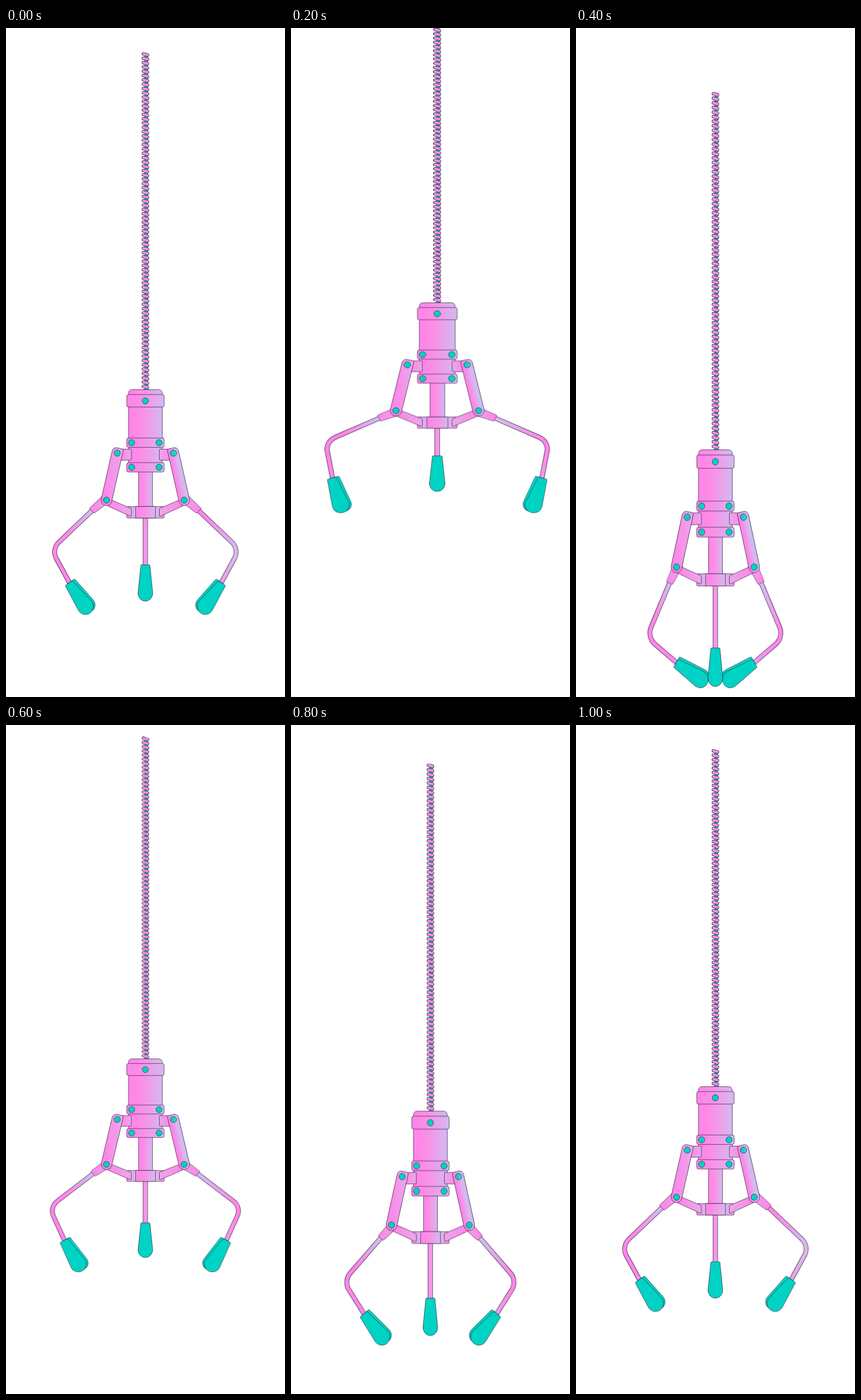
An HTML page without scripts that plays this animation: 483x1159 px, repeating every 1200 ms.

```html
<!DOCTYPE html>
<html lang="en">
<head>
<meta charset="utf-8">
<title>Claw</title>
<style>
  html, body { margin: 0; width: 100%; height: 100%; overflow: hidden; background: #fff; }
  svg { display: block; width: 483px; height: 1159px; }

  .line { stroke: #2d1f40; stroke-width: .7; stroke-linejoin: round; }
  .teal { fill: #00d3c3; }
  .edge { stroke: #2d1f40; fill: none; }
  .rod { fill: none; stroke: var(--rod); stroke-width: 6.6; }

  .left { --rod: url(#rodL); --plate: url(#plateL); --bolt: #00d3c3; }
  .right { --rod: url(#rodR); --plate: url(#plateR); --bolt: url(#boltR); }
  .plate { fill: var(--plate); }
  .pin { fill: var(--bolt); }

  .claw, .arm, .drop, .near, .far { animation: 1.2s step-end infinite; }
  .claw { animation-name: claw; transform-origin: 0 0; }
  .arm { animation-name: arm; transform-origin: 174px 818px; }
  .drop { animation-name: drop; }
  .near { animation-name: near; }
  .far { animation-name: far; }

  /* whole claw: place of the top bolt, then stretch */
  @keyframes claw {
    0%, 83.333%, 100% { transform: translate(241.25px, 646px) scale(1, 1); }
    16.667% { transform: translate(253.1px, 495px) scale(1.063, .977); }
    33.333% { transform: translate(241.25px, 751.4px) scale(1, 1.0605); }
    50% { transform: translate(241.25px, 597px) scale(1, .9545); }
    66.667% { transform: translate(241.25px, 689.1px) scale(1, 1.0305); }
  }
  @keyframes arm {
    0%, 83.333%, 100% { transform: none; }
    16.667% { transform: translate(2.6px, 3.8px) rotate(18.3deg); }
    33.333% { transform: translate(4.4px, -.6px) rotate(-22.5deg); }
    50% { transform: translate(3.6px, 1px) rotate(5deg); }
    66.667% { transform: translate(5.2px, 1.6px) rotate(-4.5deg); }
  }
  @keyframes drop {
    0%, 83.333%, 100% { transform: none; }
    16.667% { transform: translateY(-32px); }
    33.333% { transform: translateY(20.2px); }
    50% { transform: translateY(-6px); }
    66.667% { transform: translateY(10.8px); }
  }
  /* the sheen on the right rod swaps ends */
  @keyframes near {
    0%, 83.333%, 100% { stop-color: #ff86e8; }
    16.667% { stop-color: #d4b9f0; }
  }
  @keyframes far {
    0%, 83.333%, 100% { stop-color: #d9b8ee; }
    16.667% { stop-color: #ff86e8; }
  }
</style>
</head>
<body>
<svg viewBox="0 0 483 1159">
  <defs>
    <linearGradient id="body">
      <stop offset=".12" stop-color="#ff86e8"/>
      <stop offset=".4" stop-color="#fb8fe6"/>
      <stop offset="1" stop-color="#d4b9f0"/>
    </linearGradient>
    <linearGradient id="soft">
      <stop offset=".1" stop-color="#ff86e8"/>
      <stop offset="1" stop-color="#e9a9ea"/>
    </linearGradient>
    <linearGradient id="pale">
      <stop offset="0" stop-color="#ff86e8"/>
      <stop offset=".22" stop-color="#d4b9f0"/>
      <stop offset=".8" stop-color="#dcb4ee"/>
      <stop offset="1" stop-color="#fb8fe6"/>
    </linearGradient>
    <linearGradient id="plateL" x1="0" y1="1" x2=".86" y2="-.1">
      <stop offset=".2" stop-color="#ff86e8"/>
      <stop offset="1" stop-color="#e8aaea"/>
    </linearGradient>
    <linearGradient id="plateR">
      <stop offset="0" stop-color="#cfbdf0"/>
      <stop offset=".35" stop-color="#d8b6ee"/>
      <stop offset=".8" stop-color="#ff86e8"/>
    </linearGradient>
    <linearGradient id="boltR">
      <stop offset="0" stop-color="#4fd0cf"/>
      <stop offset=".7" stop-color="#00d3c3"/>
    </linearGradient>
    <linearGradient id="rodL" gradientUnits="userSpaceOnUse" x1="150" y1="0" x2="84" y2="0">
      <stop offset=".08" stop-color="#d4b9f0"/>
      <stop offset=".7" stop-color="#ff86e8"/>
    </linearGradient>
    <linearGradient id="rodR" gradientUnits="userSpaceOnUse" x1="150" y1="0" x2="84" y2="0">
      <stop class="near" offset=".2"/>
      <stop class="far" offset=".95"/>
    </linearGradient>

    <circle id="bolt" class="line" r="5.4"/>

    <!-- rope: one coil, doubled up at a pitch of 7.48 -->
    <g id="c1" stroke-linecap="round">
      <path d="M239 51.6 245 48.6" stroke="#2d1f40" stroke-width="3.8"/>
      <path d="M239 51.6 245 48.6" stroke="#00d3c3" stroke-width="2.5"/>
      <path d="M237.8 44.8 245 46.7" stroke="#2d1f40" stroke-width="5.6"/>
      <path d="M237.8 44.8 245 46.7" stroke="#f895e5" stroke-width="4.1"/>
    </g>
    <g id="c2"><use href="#c1"/><use href="#c1" y="7.48"/></g>
    <g id="c4"><use href="#c2"/><use href="#c2" y="14.96"/></g>
    <g id="c8"><use href="#c4"/><use href="#c4" y="29.92"/></g>
    <g id="c16"><use href="#c8"/><use href="#c8" y="59.84"/></g>
    <g id="c32"><use href="#c16"/><use href="#c16" y="119.68"/></g>

    <path id="bend" d="M149 836 91.4 890.9A23.5 23.5 0 0 0 87 919L111 963"/>
    <g id="finger">
      <use href="#bend" class="edge" stroke-width="8.1"/>
      <use href="#bend" class="rod"/>
      <path class="line" fill="url(#soft)" d="M145.2 831.4 168 809.5 180 820 153.4 840Q152.4 840.6 151.6 839.8L145 833Q144.4 832.2 145.2 831.4Z"/>
      <path class="line teal" d="M106 963 117.4 955.2Q118.8 954.4 119.8 955.6L150.8 990.6A13.3 13.3 0 0 1 145.6 1012Z"/>
      <path class="line teal" d="M103.6 965 113.8 958Q115 957.2 116 958.4L147.9 992.6A14 14 0 1 1 125.2 1008.6L103 967Q102.4 965.8 103.6 965Z"/>
    </g>
    <g id="link">
      <path class="line" fill="url(#soft)" d="M198 729.5H215.5Q217 729.5 217 731V747Q217 748.7 215.3 748.7L196 749Z"/>
      <path class="line" fill="url(#soft)" d="M176 815 215 831.6Q217 832.4 217 834V844Q217 846.6 214.6 845.5L176 828Z"/>
      <path class="line plate" transform="translate(192.5 736.5) rotate(12.8)" d="M-9.3-2A7 7 0 0 1-2.3-9H6.3A3 3 0 0 1 9.3-6V83.6A9.3 9.3 0 0 1-9.3 83.6Z"/>
      <use href="#bolt" class="pin" x="192.5" y="736.5"/>
      <use href="#bolt" class="teal" x="174" y="818"/>
    </g>
  </defs>

  <g class="claw"><g transform="translate(-241.25 -646)">
    <use href="#c32"/>
    <use href="#c32" y="239.36"/>
    <use href="#c8" y="478.72"/>
    <use href="#c4" y="538.56"/>
    <use href="#c2" y="568.48"/>

    <g class="left"><g class="arm"><use href="#finger"/></g></g>
    <g class="right" transform="translate(482.5) scale(-1 1)"><g class="arm"><use href="#finger"/></g></g>

    <g class="drop">
      <rect class="line" fill="url(#soft)" x="237.2" y="815" width="8" height="118"/>
      <path class="line teal" d="M235 930H247.6Q249 930 249.2 931.4L254 979A12.75 14 0 0 1 228.5 979L233.4 931.4Q233.6 930 235 930Z"/>
    </g>

    <g class="line" fill="url(#body)">
      <rect x="229.5" y="765" width="24" height="66"/>
      <rect x="212" y="626.5" width="58.5" height="30" rx="6"/>
      <rect x="212" y="650" width="58.5" height="110"/>
      <rect x="209" y="635" width="64.8" height="21.7" rx="3"/>
      <rect x="209" y="710.3" width="64.8" height="16.2" rx="3"/>
      <rect x="209" y="753" width="64.8" height="16.2" rx="3"/>
      <rect x="209" y="829" width="64.8" height="20" rx="2" fill="url(#pale)"/>
      <rect x="224.3" y="829" width="34.4" height="20"/>
    </g>

    <g class="left"><use href="#link"/></g>
    <g class="right" transform="translate(482.5) scale(-1 1)"><use href="#link"/></g>

    <g class="teal">
      <use href="#bolt" x="241.25" y="646"/>
      <use href="#bolt" x="217.5" y="718.5"/>
      <use href="#bolt" x="265" y="718.5"/>
      <use href="#bolt" x="217.5" y="761"/>
      <use href="#bolt" x="265" y="761"/>
    </g>
  </g></g>
</svg>
</body>
</html>
```
